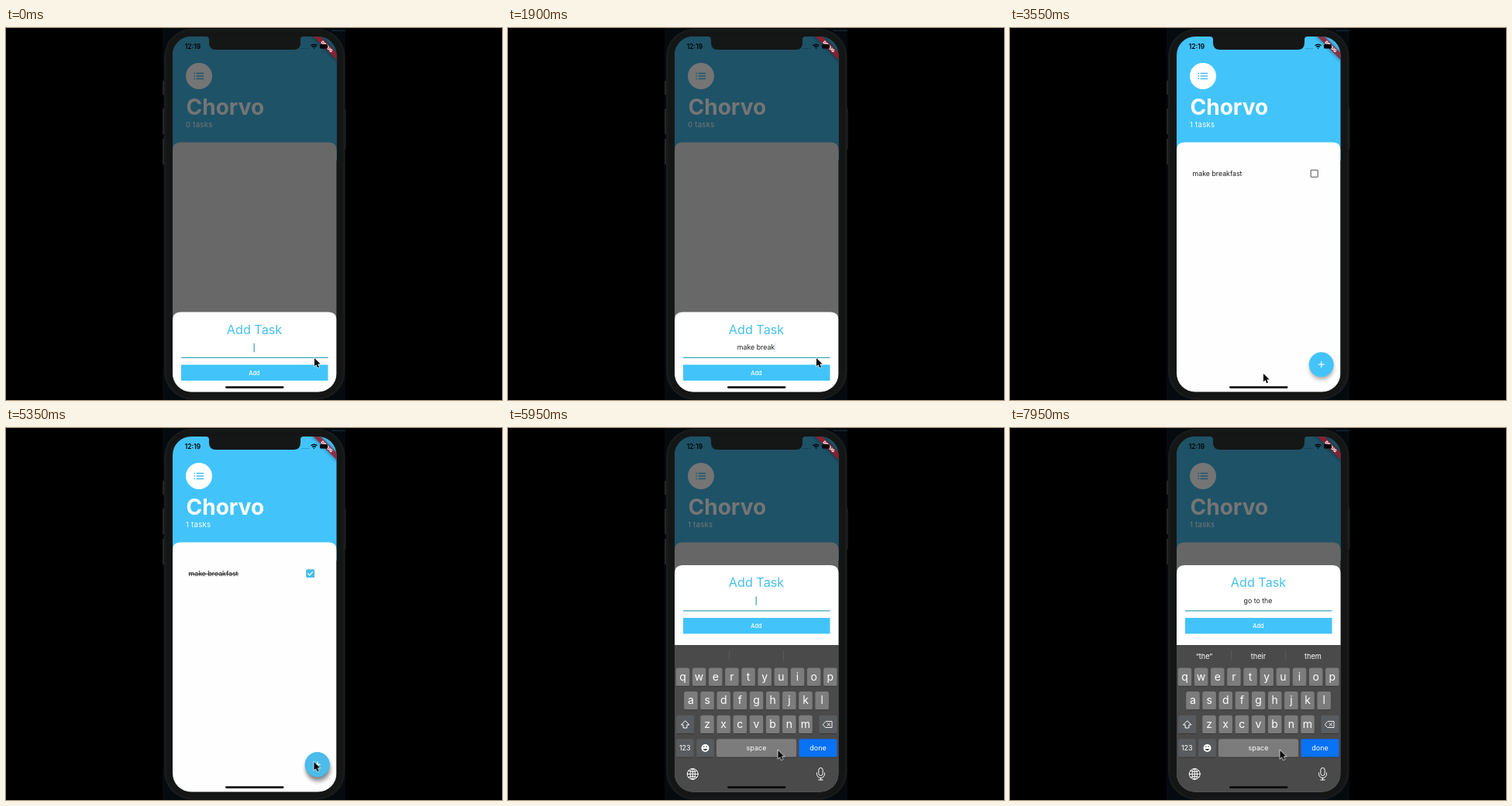
An HTML page that plays this animation: 640x480 px, repeating every 8000 ms.

```html
<!DOCTYPE html>
<html lang="en">
<head>
<meta charset="utf-8">
<title>To-do app</title>
<style>
html, body { margin: 0; width: 100%; height: 100%; overflow: hidden; background: #000; }
svg { display: block; width: 640px; height: 480px; font-family: Inter, "Liberation Sans", sans-serif; }
text { white-space: pre; }
.mid { text-anchor: middle; }
.line { fill: none; stroke: #fff; stroke-linecap: round; stroke-linejoin: round; }
.blue { fill: #42c4fa; }
.key { fill: rgba(255, 255, 255, .28); }
.side { fill: rgba(155, 175, 190, .18); }
.done { fill: #0a72f5; }
.a { animation: 8s linear infinite; }

#dim { animation-name: dim; }
#header { animation-name: header; }
#panel { animation-name: panel; }
#sheet { animation-name: sheet; }
.keyboard { animation-name: keyboard; }
#glow { animation-name: glow; }
#mouse { animation-name: mouse; }
#caret { animation-name: caret; }
#addSplash { animation-name: addSplash; }
#fabPress { animation-name: fabPress; }
#boxSplash { animation-name: boxSplash; transform-origin: 392.5px 188px; }
#checked { animation-name: checked; }

@keyframes dim { 0%, 37.25% { opacity: 1 } 40%, 67.5% { opacity: 0 } 70.6%, 100% { opacity: 1 } }
@keyframes header { 0%, 37.25% { fill: #42b4e0 } 40%, 67.5% { fill: #42c4fa } 70.6%, 100% { fill: #42b4e0 } }
@keyframes panel { 0%, 37.25% { fill: #e2e4e2 } 40%, 67.5% { fill: #fefefe } 70.6%, 100% { fill: #dedfde } }
@keyframes sheet {
  0%, 37.25% { transform: none; animation-timing-function: ease-in }
  40%, 67.5% { transform: translateY(114px); animation-timing-function: ease-out }
  70.6%, 73.1% { transform: none }
  73.11%, 100% { transform: translateY(-189.5px) }
}
@keyframes keyboard {
  0%, 70.3% { transform: translateY(192px); animation-timing-function: ease-in }
  71.875% { transform: translateY(94px); animation-timing-function: ease-out }
  74.3%, 100% { transform: none }
}
@keyframes glow { 0%, 71% { opacity: 0 } 71.6%, 73.1% { opacity: 1 } 73.11%, 100% { opacity: 0 } }
@keyframes mouse {
  0%, 28.75% { transform: translate(398px, 426px); animation-timing-function: ease-in-out }
  32.5%, 43.7% { transform: translate(327px, 443px) }
  44.35%, 46.25% { transform: translate(327px, 446px); animation-timing-function: ease-in-out }
  53.2%, 59.3% { transform: translate(392px, 187px); animation-timing-function: ease-in-out }
  64.4%, 68% { transform: translate(397.5px, 431px); animation-timing-function: ease-in-out }
  71.6%, 100% { transform: translate(348.5px, 416px) }
}
@keyframes caret {
  0%, 5% { opacity: 1 } 7%, 10% { opacity: 0 } 12%, 17.5% { opacity: 1 }
  19.5%, 22.8% { opacity: 0 } 23.75% { opacity: .25 } 25%, 30% { opacity: 1 }
  32%, 34% { opacity: 0 } 36%, 76% { opacity: 1 } 77.5%, 81% { opacity: 0 }
  82.5%, 88% { opacity: 1 } 89.5%, 92% { opacity: 0 } 93.5%, 97% { opacity: 1 }
  98.5%, 100% { opacity: 0 }
}
@keyframes addSplash { 0%, 35.6% { opacity: 0; r: 5px } 36.5% { opacity: .25; r: 40px } 38.5%, 100% { opacity: 0; r: 110px } }
@keyframes fabPress { 0%, 66.2% { opacity: 0 } 66.8%, 68.5% { opacity: 1 } 71%, 100% { opacity: 0 } }
@keyframes boxSplash {
  0%, 53.7% { opacity: 0; transform: scale(.2) }
  55% { opacity: .2; transform: scale(1) }
  56.3%, 100% { opacity: 0; transform: scale(1) }
}
@keyframes checked { 0%, 53.8% { opacity: 0 } 56%, 100% { opacity: 1 } }
</style>
</head>
<body>
<svg viewBox="0 0 640 480">
  <defs>
    <clipPath id="screen"><rect x="215" y="11" width="211.500" height="458.500" rx="24"/></clipPath>
    <clipPath id="button"><rect x="226" y="434.500" width="189.500" height="20.500"/></clipPath>
    <filter id="soft" x="-50%" y="-50%" width="200%" height="200%"><feGaussianBlur stdDeviation="2.500"/></filter>
    <filter id="blur" x="-20%" y="-50%" width="140%" height="200%"><feGaussianBlur stdDeviation="4"/></filter>
  </defs>

  <!-- phone body -->
  <rect width="640" height="480"/>
  <rect x="202" width="236" height="480" fill="#050a0f"/>
  <path d="M420 3.500H438" stroke="#14303d"/>
  <path d="M203 68V86M203 104V137M203 143V176M437.500 104V156" stroke="#232626" stroke-width="2"/>
  <rect x="204" y="1" width="233.500" height="478.500" rx="36" fill="#191c1c"/>
  <rect x="206.500" y="3" width="228.500" height="474.500" rx="34" fill="#141616"/>

  <g clip-path="url(#screen)">
    <rect id="header" class="a" x="215" y="11" width="212" height="160"/>
    <circle cx="249" cy="62" r="17" fill="#fff"/>
    <path d="M242.500 58.500h1.600m1.500 0h9.600M242.500 62h1.600m1.500 0h9.600M242.500 65.500h1.600m1.500 0h9.600" stroke="#42bdf0" stroke-width="1.500"/>
    <text x="232.500" y="112" font-size="28" font-weight="700" fill="#fff">Chorvo</text>
    <text id="count" x="232" y="128" font-size="9.600" letter-spacing=".25" fill="#fff"></text>
    <path id="panel" class="a" d="M215 470V157.500Q215 147.500 225 147.500H416.500Q426.500 147.500 426.500 157.500V470Z"/>

    <g id="task">
      <text x="235.500" y="191" font-size="8.800" fill="#1c1c1c">make breakfast</text>
      <rect x="388.200" y="183.300" width="9" height="9" rx=".8" fill="none" stroke="#757575" stroke-width="1.300"/>
      <circle id="boxSplash" class="a blue" cx="392.500" cy="188" r="11"/>
      <g id="checked" class="a">
        <rect x="387.500" y="182.600" width="10.400" height="10.400" rx="1" fill="#42bdee"/>
        <path class="line" d="M389.700 188l2 2 4-4.300" stroke-width="1.200"/>
      </g>
      <path id="strike" d="M235.500 188.400H300.300" stroke="#1c1c1c" stroke-width=".9"/>
    </g>

    <circle cx="402" cy="438" r="15.500" opacity=".32" filter="url(#soft)"/>
    <circle class="blue" cx="401.700" cy="434.200" r="16"/>
    <g id="fabPress" class="a">
      <circle cx="403" cy="441" r="16" opacity=".25" filter="url(#soft)"/>
      <circle cx="401.700" cy="434.200" r="16" fill="#4cbcea"/>
    </g>
    <path d="M397.700 434.200h8M401.700 430.200v8" stroke="#fff" stroke-width="1.200"/>

    <rect id="dim" class="a" x="215" y="11" width="212" height="459" fill="rgba(0,0,0,.54)"/>

    <!-- add-task sheet -->
    <g id="sheet" class="a">
      <path d="M215 470V377Q215 366.500 226 366.500H415.500Q426.500 366.500 426.500 377V470Z" fill="#fff"/>
      <text class="mid" x="320.500" y="394.700" font-size="16.200" fill="#45c1ea">Add Task</text>
      <text id="typed" class="mid" x="320" y="415" font-size="8.800" fill="#222"></text>
      <rect id="caret" class="a" y="406.800" width="1.200" height="11.400" fill="#3b9fb4"/>
      <path d="M226 425.400H415.500" stroke="#36a7bb" stroke-width="1.300"/>
      <rect class="blue" x="226" y="434.500" width="189.500" height="20.500"/>
      <g clip-path="url(#button)"><circle id="addSplash" class="a" cx="327" cy="444" r="5" fill="#fff"/></g>
      <text class="mid" x="320.500" y="447.500" font-size="7.400" font-weight="500" fill="#fff">Add</text>
    </g>

    <!-- keyboard: backing, the sheet's colours showing through, then keys -->
    <rect class="keyboard a" x="215" y="280" width="212" height="192" fill="#4b4a4b"/>
    <g id="glow" class="a" filter="url(#blur)" fill="#208098">
      <rect x="222" y="432" width="197" height="26" opacity=".4"/>
      <rect x="285" y="380" width="72" height="14" opacity=".25"/>
    </g>
    <g class="keyboard a" fill="#fff">
      <path d="M285.500 287V300M355.500 287V300" stroke="#5d5d5d" stroke-width=".8"/>
      <g id="hints" class="mid" font-size="9.200"></g>
      <g id="keys" class="mid" font-size="14"></g>
      <path class="line" d="M228.500 378l-5 5h2.600v4h4.800v-4h2.600Z"/>
      <path class="line" d="M406.500 382.500l3.500-4h8v8h-8ZM412 380.700l3.600 3.600m0-3.600l-3.600 3.600" stroke-width=".9"/>
      <circle cx="254.500" cy="413" r="5"/>
      <path d="M251.500 414q3 4.500 6 0Z" fill="#444"/>
      <circle cx="252.800" cy="411.300" r=".8" fill="#444"/><circle cx="256.200" cy="411.300" r=".8" fill="#444"/>
      <g class="line" stroke-width="1">
        <circle cx="238.300" cy="446.500" r="7"/><ellipse cx="238.300" cy="446.500" rx="3.200" ry="7"/>
        <path d="M231.300 446.500h14M238.300 439.500v14M232.800 442.500q5.500 2.400 11 0M232.800 450.500q5.500-2.400 11 0"/>
        <rect x="400.800" y="438.500" width="5.400" height="10" rx="2.700"/>
        <path d="M398.500 445v1.500a5 5 0 0 0 10 0V445M403.500 451.500v2.500M400.800 454h5.400"/>
      </g>
    </g>
    <rect x="283" y="462.200" width="75.500" height="2.800" rx="1.400" fill="#0c0c0c"/>

    <!-- status bar -->
    <text x="230.800" y="27.200" font-size="8.400" font-weight="600">12:19</text>
    <path d="M381 26.500h10" stroke="#000" stroke-dasharray="1.200 1.500" opacity=".4"/>
    <g transform="translate(427 11) rotate(45)">
      <rect x="-24" y="15" width="48" height="7" opacity=".4" filter="url(#soft)"/>
      <rect x="-24" y="15" width="48" height="6.500" fill="#a31b2e" opacity=".8"/>
      <text class="mid" y="20.200" font-size="5.400" font-weight="900" fill="#fff">DEBUG</text>
    </g>
    <path d="M393.500 22.800q4-3.400 8 0M395.200 24.500q2.300-2 4.600 0M396.800 26.200h1.400" fill="none" stroke="#000" stroke-width="1.300"/>
    <rect x="405" y="21" width="10" height="5.500" rx="1.500"/>
  </g>
  <path d="M258 10H384V11Q380 11 380 15V19Q380 28 371 28H271Q262 28 262 19V15Q262 11 258 11Z" fill="#151717"/>

  <path id="mouse" class="a" d="M0 0V10.500L2.400 8.300 4.200 12.300 6 11.500 4.300 7.600H7.600Z" stroke="#fff" stroke-width="1.200" paint-order="stroke"/>
</svg>
<script>
const $ = id => document.getElementById(id);

// Keyboard layout
function key(x, y, w, label, cls = "key", size = 14, dy = 16.2) {
  return `<rect x="${x + 1}" y="${y + 23.3}" width="${w - 2}" height=".9" fill="#333"/>` +
    `<rect class="${cls}" x="${x}" y="${y}" width="${w}" height="23.3" rx="2.6"/>` +
    `<text x="${x + w / 2}" y="${y + dy}" font-size="${size}">${label}</text>`;
}
const row = (letters, x, y) =>
  [...letters].map((c, i) => key(x + i * 21.15, y, 17.5, c)).join("");

$("keys").innerHTML =
  row("qwertyuiop", 216.7, 309.5) + row("asdfghjkl", 227.2, 340) + row("zxcvbnm", 248.3, 370.7) +
  key(217, 370.7, 23, "", "side") + key(401.5, 370.7, 23, "", "side") +
  key(217, 401.3, 22.5, "123", "side", 9, 14.8) + key(243.3, 401.3, 22.5, "", "side") +
  key(269, 401.3, 103, "space", "key", 9, 14.6) + key(375.5, 401.3, 49, "done", "done", 9, 14.6);
$("hints").innerHTML = [250.5, 320.5, 391].map(x => `<text x="${x}" y="298"></text>`).join("");

// Typing: time of each keystroke
const first = { text: "make breakfast", at: [700, 800, 950, 1100, 1250, 1400, 1500, 1600, 1700, 1850, 2000, 2100, 2250, 2400] };
const second = { text: "go to the", at: [6300, 6400, 6600, 6800, 7000, 7250, 7450, 7600, 7800] };
const suggestions = [
  "||", "“g”|good|got", "“go”|going|good", "to|back|home", "“t”|to|the", "“to”|too|town",
  "the|bed|sleep", "“t”|the|to", "“th”|the|that", "“the”|their|them"
];

function draw() {
  const t = ($("mouse").getAnimations()[0]?.currentTime || 0) % 8000;
  const job = t < 4000 ? first : second;
  const n = job.at.filter(a => a <= t).length;
  const typed = $("typed");
  typed.textContent = job.text.slice(0, n);
  const width = n ? typed.getComputedTextLength() : 0;
  $("caret").setAttribute("x", 319.6 + width / 2);

  const words = suggestions[job === second ? n : 0].split("|");
  [...$("hints").children].forEach((el, i) => el.textContent = words[i]);

  const added = t >= 2980;
  $("count").textContent = `${added ? 1 : 0} tasks`;
  $("task").style.display = added ? "" : "none";
  $("strike").style.display = t >= 4350 ? "" : "none";
  requestAnimationFrame(draw);
}
draw();
</script>
</body>
</html>
```
